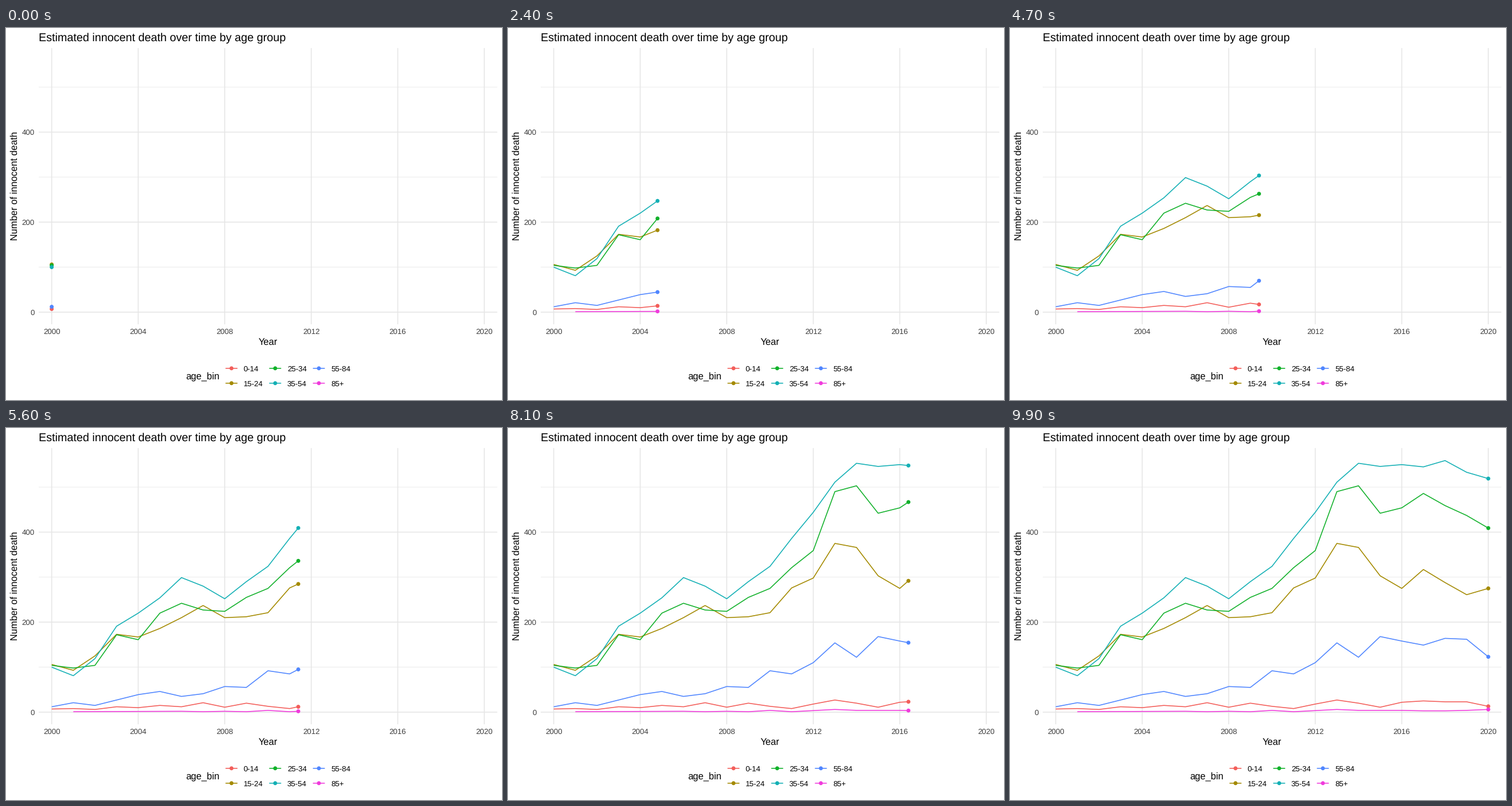
Animation, 864 px wide and 648 px high, one loop 10 s. Source, as a matplotlib script:

```python
import matplotlib.pyplot as plt
import numpy as np
from matplotlib.animation import FuncAnimation

W, H, DPI = 864, 648, 72  # at 72 dpi one point is one pixel
FRAMES, INTERVAL = 100, 100
PANEL = dict(left=57.0, right=855.75, top=34.9, bottom=516.1)
GRID, TICK_TEXT = "#e6e6e6", "#3d3d3d"
LINE, DOT = 1.6, 6.9

plt.rcParams.update({
    "font.family": "Liberation Sans",
    "text.hinting": "no_hinting",
    "path.simplify": False,
})

YEARS = np.arange(2000, 2021)
GROUPS = {
    "0-14": ("#f35e5a", [7, 8, 6, 12, 10, 15, 12, 21, 11, 20, 13,
                         8, 18, 27, 20, 11, 22, 25, 23, 23, 13]),
    "15-24": ("#a48a00", [106, 93, 125, 173, 167, 186, 210, 237, 210, 212, 221,
                          276, 298, 375, 366, 303, 275, 317, 288, 261, 275]),
    "25-34": ("#12b12b", [104, 98, 104, 172, 161, 220, 242, 227, 224, 255, 275,
                          321, 359, 490, 503, 442, 454, 486, 459, 437, 409]),
    "35-54": ("#14b0b5", [100, 81, 119, 191, 220, 254, 299, 280, 252, 290, 324,
                          386, 444, 511, 553, 546, 550, 545, 559, 533, 519]),
    "55-84": ("#5086ff", [12, 21, 15, 27, 39, 46, 35, 41, 57, 55, 92,
                          85, 110, 154, 122, 168, 158, 149, 164, 162, 123]),
    # starts in 2001
    "85+": ("#f03cdc", [1, 1.2, 1.4, 1.6, 1.8, 2, 1, 2, 1, 4,
                        1, 3.5, 6, 4, 4, 4, 3, 3, 4, 6]),
}
COLORS = [color for color, _ in GROUPS.values()]


def px(year):
    return PANEL["left"] + (year - 1999.4) * (PANEL["right"] - PANEL["left"]) / 21.2


def py(value):
    return 495.0 - value * 0.784


fig = plt.figure(figsize=(W / DPI, H / DPI), dpi=DPI, facecolor="white")
ax = fig.add_axes([0, 0, 1, 1])
ax.set(xlim=(0, W), ylim=(H, 0))
ax.axis("off")


def stroke(xs, ys, color, width=LINE, z=2):
    return ax.plot(xs, ys, color=color, lw=width, zorder=z, snap=False,
                   solid_capstyle="butt", solid_joinstyle="round")[0]


def label(x, y, text, size, color="black", **kw):
    ax.text(x, y, text, size=size, color=color,
            **{"va": "baseline", "ha": "left", **kw})


def dots(points):
    return ax.scatter(*np.transpose(points), s=DOT ** 2, c=COLORS,
                      linewidths=0, zorder=4, snap=False)


def draw_panel():
    sides = [PANEL["left"], PANEL["right"]]
    for value in range(0, 600, 100):
        major = value in (0, 200, 400)
        stroke(sides, [py(value)] * 2, GRID, LINE if major else LINE / 2, 1)
        if major:
            label(49.6, py(value) + 4.7, str(value), 13.2, TICK_TEXT, ha="right")
    for year in range(2000, 2021, 4):
        stroke([px(year)] * 2, [PANEL["top"], PANEL["bottom"]], GRID, z=1)
        label(px(year), 532.9, str(year), 13.2, TICK_TEXT, ha="center")

    label(57, 22.45, "Estimated innocent death over time by age group", 19.8)
    label(456.4, 551.7, "Year", 16.5, ha="center")
    label(20.1, 275.5, "Number of innocent death", 16.5, rotation=90,
          rotation_mode="anchor", ha="center")


def draw_legend():
    label(313, 611.7, "age_bin", 16.5)
    keys = []
    for i, (name, (color, _)) in enumerate(GROUPS.items()):
        x, y = 392.8 + 76.1 * (i // 2), 592.8 + 25.92 * (i % 2)
        stroke([x - 10.4, x + 10.4], [y, y], color)
        label(x + 21.1, y + 4.8, name, 13.2)
        keys.append((x, y))
    dots(keys)


draw_panel()
draw_legend()

series = [(YEARS[-len(v):], np.array(v, float)) for _, v in GROUPS.values()]
lines = [stroke([], [], color, z=3) for color in COLORS]
heads = dots([(0, 0)] * len(COLORS))


def update(frame):
    # the reveal snaps to fifths of a year
    now = 2000 + round(frame * 100 / (FRAMES - 1)) / 5
    tips = []
    for line, (years, values) in zip(lines, series):
        if now < years[0]:
            line.set_data([], [])
            continue
        past = years < now
        xs = px(np.append(years[past], now))
        ys = py(np.append(values[past], np.interp(now, years, values)))
        line.set_data(xs, ys)
        tips.append((xs[-1], ys[-1]))
    heads.set_offsets(tips)
    return [*lines, heads]


anim = FuncAnimation(fig, update, frames=FRAMES, interval=INTERVAL,
                     init_func=lambda: update(0), repeat=True, repeat_delay=0)
plt.show()
```
